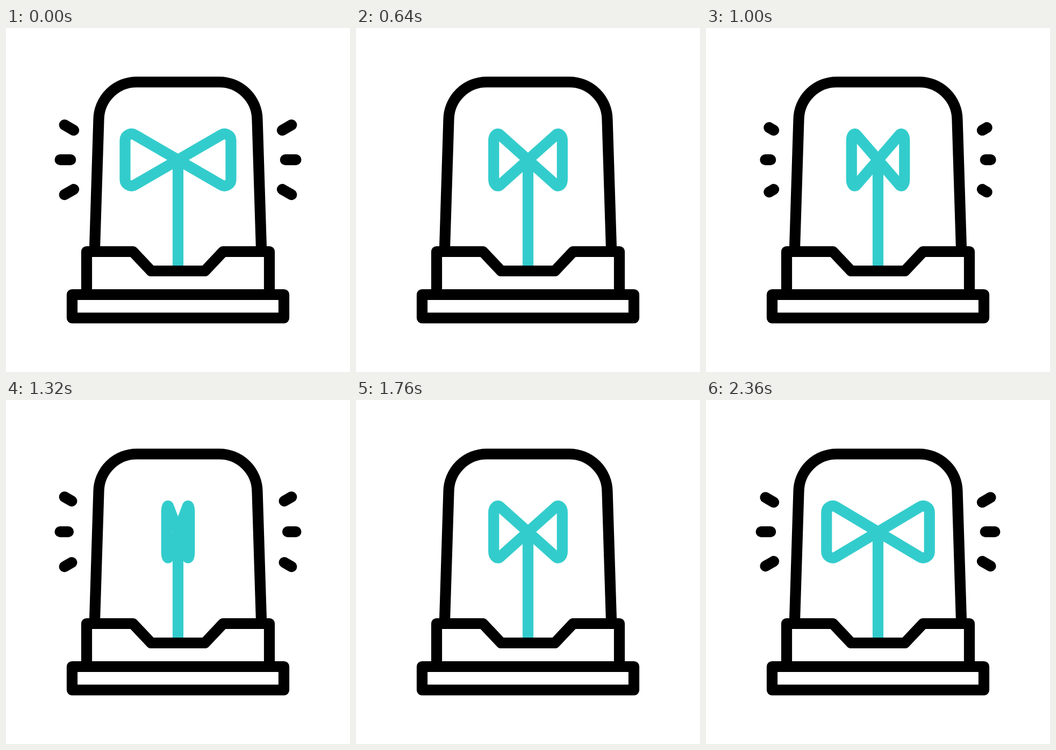
Write an HTML page that moves like this. It is 640 by 640 pixels and loops after 2.4 s.

```html
<!DOCTYPE html>
<html lang="en">
<head>
<meta charset="utf-8">
<title>Siren</title>
<style>
  html, body { margin: 0; width: 100%; height: 100%; overflow: hidden; background: #fff; }
  svg { display: block; width: 100%; height: 100%; }
  .line { fill: none; stroke: #000; stroke-width: 20.2; stroke-linejoin: round; }
  .teal { stroke: #33cccc; }
  .rays { stroke-linecap: round; }
</style>
</head>
<body>
<svg viewBox="0 0 640 640">
  <path class="line teal" d="M320 245.3V452"/>
  <path class="line teal" id="bow"/>
  <path class="line" d="M164.8 416L172.5 170A70.6 70.6 0 0 1 243 100.5H397A70.6 70.6 0 0 1 467.5 170L475.2 416"/>
  <path class="line" d="M150 496V416H236L270 452H370L404 416H490V496"/>
  <rect class="line" x="123" y="496" width="394" height="43.5"/>
  <path class="line rays" id="rays"/>
  <use href="#rays" transform="matrix(-1 0 0 1 640 0)"/>
</svg>
<script>
  const LOOP = 2400, STEP = 40, MOVE = 400;
  const bow = document.getElementById('bow');
  const rays = document.getElementById('rays');

  // inner x, y and outer x, y of the left-hand rays
  const RAYS = [
    [126, 190.2, 108.8, 180.3],
    [120.2, 245.2, 100.6, 245.2],
    [126, 300.2, 108.8, 310.1]
  ];

  const ease = v => {
    const s = Math.min(1, Math.max(0, v));
    return s * s * (3 - 2 * s);
  };
  const mix = (a, b, k) => a + (b - a) * k;

  // Bow tie squeezed horizontally to the factor s
  function bowPath(s) {
    const p = (x, y) => `${(320 + x * s).toFixed(3)} ${(245.4 + y).toFixed(3)} `;
    const corner = (x, y) =>
      p(98.5 * x, 45.5 * y) + p(88.5 * x, 51.3 * y) + p(80.5 * x, 46.7 * y);
    const back = (x, y) =>
      p(88.5 * x, 51.3 * y) + p(98.5 * x, 45.5 * y) + p(98.5 * x, 36.3 * y);
    return 'M' + p(-98.5, 36.3) + 'L' + p(-98.5, -36.3) + 'C' + corner(-1, -1) +
      'L' + p(80.5, 46.7) + 'C' + back(1, 1) +
      'L' + p(98.5, -36.3) + 'C' + corner(1, -1) +
      'L' + p(-80.5, 46.7) + 'C' + back(-1, 1) + 'Z';
  }

  // Visible part of every ray, from 0 (inner end) to 1 (outer end)
  function rayPath(from, to) {
    if (to - from < 0.001) return '';
    return RAYS.map(([x1, y1, x2, y2]) =>
      `M${mix(x1, x2, from)} ${mix(y1, y2, from)}L${mix(x1, x2, to)} ${mix(y1, y2, to)}`
    ).join('');
  }

  function draw(now) {
    const t = Math.floor((now % LOOP) / STEP + 0.001) * STEP % LOOP;

    const turn = t % (2 * MOVE);
    bow.setAttribute('d', bowPath(ease(Math.abs(turn - MOVE) / MOVE)));

    // The second regrowth starts one step later and is cut by the loop
    const second = t >= 1200;
    const u = second ? t - 1200 : t;
    const grow = second ? 840 : 800;
    rays.setAttribute('d', u < grow
      ? rayPath(ease(u / MOVE), 1)
      : rayPath(0, ease((u - grow) / MOVE)));

    requestAnimationFrame(draw);
  }
  draw(performance.now());
</script>
</body>
</html>
```
